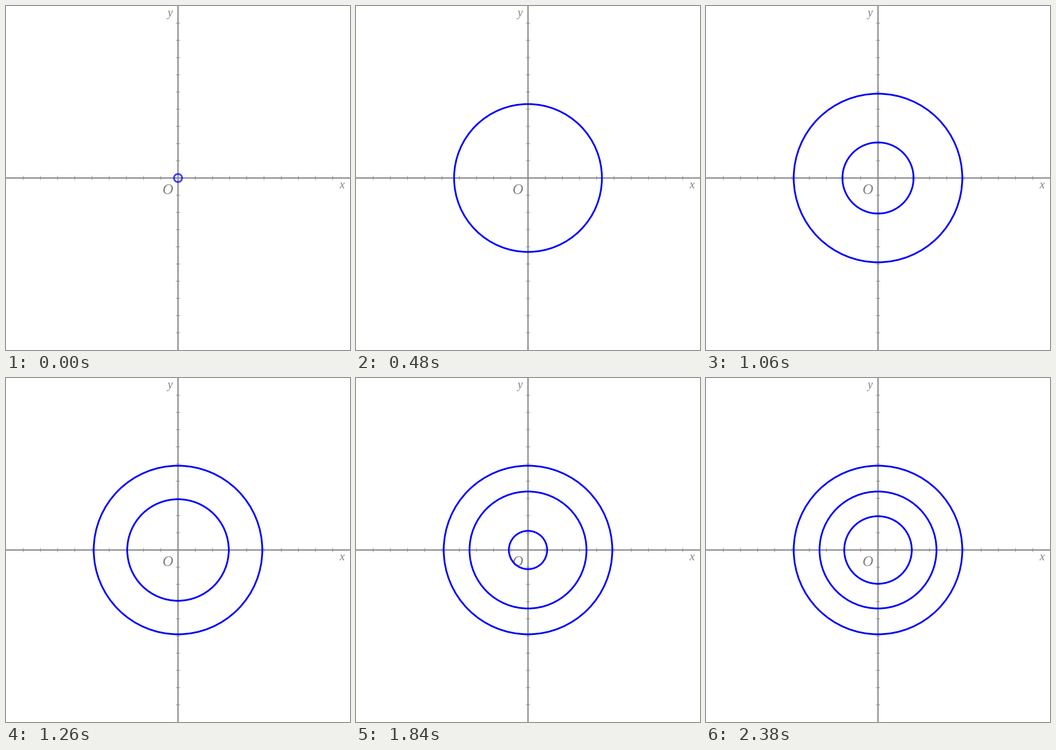
Write a matplotlib script that moves like this. It is 600 px wide and 600 px high and loops after 2.4 s.

```python
import math

import matplotlib.pyplot as plt
from matplotlib.animation import FuncAnimation
from matplotlib.patches import Circle

SIZE, DPI = 600, 100
PX = 72 / DPI
MID = SIZE / 2
GRAY = "#808080"
STEPS = 40               # frames each ring takes to grow
REACH = (150, 105, 60)   # radius each ring grows towards
REST = (147, 102, 59)    # radius once the next ring starts

fig = plt.figure(figsize=(SIZE / DPI, SIZE / DPI), dpi=DPI, facecolor="white")
ax = fig.add_axes([0, 0, 1, 1])
ax.set_xlim(0, SIZE)
ax.set_ylim(SIZE, 0)
ax.axis("off")


def line(xs, ys, width):
    ax.plot(xs, ys, color=GRAY, lw=width * PX, solid_capstyle="butt",
            snap=False, zorder=1)


def label(x, y, text, size):
    ax.text(x, y, text, family="Liberation Serif", style="italic",
            size=size * PX, color=GRAY, ha="left", va="baseline", zorder=2)


line([0, SIZE], [MID, MID], 2)
line([MID, MID], [0, SIZE], 2)
for p in range(30, SIZE, 30):
    if p != MID:
        line([p, p], [MID - 3.5, MID + 3.5], 1)
        line([MID - 3.5, MID + 3.5], [p, p], 1)

label(281.5, 18, "y", 20)
label(581.5, 318, "x", 20)
label(272.5, 327.5, "O", 26)

rings = [Circle((MID, MID), 1, fill=False, ec="#0000ff", lw=3 * PX, zorder=3)
         for _ in REACH]
for ring in rings:
    ax.add_patch(ring)


def draw(frame):
    active, step = divmod(frame, STEPS)
    for i, ring in enumerate(rings):
        ring.set_visible(i <= active)
        if i < active:
            ring.set_radius(REST[i])
            ring.set_alpha(1)
        elif i == active:
            ring.set_radius(REACH[i] * math.erf(0.0417 * (step + 1)))
            ring.set_alpha(min(1, 0.75 + 0.05 * step))
    return rings


anim = FuncAnimation(fig, draw, frames=STEPS * len(REACH), interval=20,
                     repeat=True, repeat_delay=0, blit=False)
plt.show()
```
